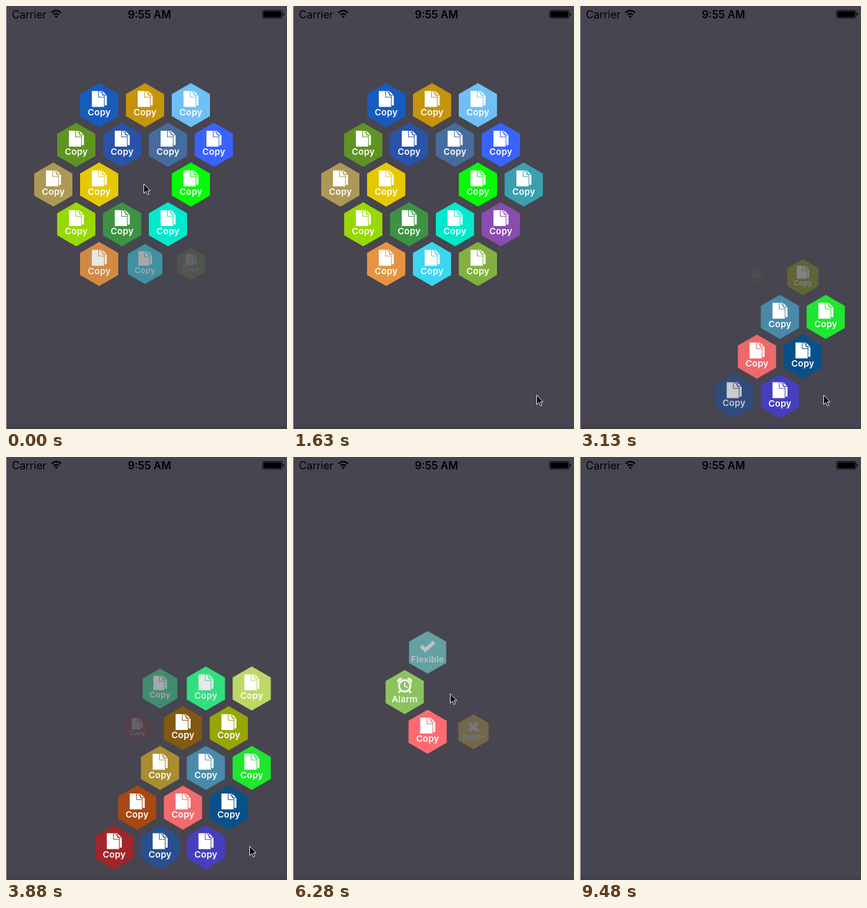
Recreate the animation shown at these times as an HTML page. Size 478 by 719 pixels, loop 9580 ms.

```html
<!DOCTYPE html>
<html lang="en">
<head>
<meta charset="utf-8">
<title>Hexagon menu</title>
<style>
  html, body { margin: 0; width: 100%; height: 100%; overflow: hidden; background: #47454f; }
  svg { display: block; }
  text { font-family: Inter, "Open Sans", sans-serif; }
  .label { font-size: 15px; font-weight: 600; letter-spacing: .2px; fill: #fff; text-anchor: middle; }
  .line { fill: none; stroke-width: 1.1; }
</style>
</head>
<body>
<svg width="478" height="719" viewBox="0 0 478 719">
  <defs>
    <clipPath id="hexClip"><path d="M0-37.4L32.5-18.7V18.7L0 37.4-32.5 18.7V-18.7Z"/></clipPath>
    <linearGradient id="forest" x2="0" y2="1">
      <stop offset="0" stop-color="#3f9a0c"/><stop offset=".4" stop-color="#2f7a10"/>
      <stop offset=".62" stop-color="#25330f"/><stop offset="1" stop-color="#6b5f38"/>
    </linearGradient>
    <linearGradient id="dust" x2="0" y2="1">
      <stop offset="0" stop-color="#a3977d"/><stop offset=".35" stop-color="#cfc3aa"/>
      <stop offset=".6" stop-color="#8d7752"/><stop offset="1" stop-color="#5a4426"/>
    </linearGradient>
  </defs>
  <rect width="478" height="719" fill="#47454f"/>
  <rect y="714" width="478" height="5" fill="#413f4a"/>
  <rect id="edge" width="1" height="719"/>
  <g id="status">
    <text x="10" y="21" font-size="18">Carrier</text>
    <text x="244" y="21" font-size="18" font-weight="600" text-anchor="middle">9:55 AM</text>
    <g fill="none" stroke="#000" stroke-width="2.4">
      <path d="M77.5 11.5Q85.500 4 93.500 11.500"/><path d="M81 15Q85.500 10.800 90 15"/>
    </g>
    <path d="M85.500 20.500L82.800 17.600Q85.500 15.300 88.200 17.600Z"/>
    <rect x="436.500" y="7.500" width="33" height="13" rx="2" fill="none" stroke="#000"/>
    <rect x="438" y="9" width="30" height="10" rx="1"/>
    <path d="M471 11.500q2 .5 2 2.500t-2 2.500z"/>
  </g>
  <g id="menus"></g>
  <path id="cursor" d="M.5.500V16.300L4.200 13 6.700 18.700 9.200 17.600 6.800 12H11.500Z" fill="#000" stroke="#fff" stroke-width="1"/>
</svg>
<script>
const LOOP = 9580, STAGGER = 100, FADE = 370;
const HEX = 'M0-37.4L32.5-18.7V18.7L0 37.4-32.5 18.7V-18.7Z';

const icons = {
  Copy: c => `<path fill="#fff" d="M-12.500-24H5.500L13-16.500V.5H9V3H-12.500Z"/>
    <path class="line" stroke="${c}" d="M-1-24V-13.500H8.500M1.500-24L8.800-15.500V3M5.500-24V-17H13"/>`,
  Flexible: () => '<path fill="none" stroke="#fff" stroke-width="6.500" d="M-11.500-11L-4-4 11.500-18"/>',
  Delete: () => '<path stroke="#fff" stroke-width="7" d="M-9-19L9-2M9-19L-9-2"/>',
  Alarm: () => `<g fill="none" stroke="#fff" stroke-width="3.200">
    <circle cy="-10.500" r="9.600"/><path d="M-7-3L-10.500 1.500M7-3L10.500 1.500"/>
    <path stroke-width="2" d="M0-17V-10.500L5-7.500"/></g>
    <path fill="#fff" d="M-12.500-15Q-14-26-3.500-23.500ZM12.500-15Q14-26 3.500-23.500Z"/>`,
  Photo: () => `<path fill="#fff" d="M-13-18H-7L-5-22H5L7-18H13V2H-13Z"/>
    <circle cy="-8.500" r="6.300" fill="none" stroke="#3c8a1a" stroke-width="3"/>`,
  Game: () => `<circle cy="-10.500" r="13.500" fill="#fff"/>
    <path fill="#6e5c42" d="M-2-14L4-17 8-12 5-7-1-8ZM-12-15L-7-21-4-18-8-11ZM2-1L8-4 5 1Z"/>`
};

const scenery = {
  Photo: '<path stroke="#1c3a0a" stroke-width="2.5" d="M-27-20V18M-18-24V10M16-24V10M25-18V18"/><path fill="#8b7b4d" d="M-3 16H6L22 40H-22Z"/>',
  Game: '<path fill="#4a3a24" d="M-33-2L-25-6-20 6-8 9-10 24-33 24ZM20-4L33-8V20L14 24Z"/><path fill="#efe7d6" d="M-22-22L0-36 10-31-8-16Z"/>'
};

// Cells spiral out counter-clockwise, leaving out those beyond the screen.
function spiral(cx, cy) {
  const cells = [];
  const steps = [[-39, -67.5], [-78, 0], [-39, 67.5], [39, 67.5], [78, 0], [39, -67.5]];
  for (let ring = 1; ring < 5; ring++) {
    let x = cx + 78 * ring, y = cy;
    for (const [dx, dy] of steps)
      for (let i = 0; i < ring; i++) {
        x += dx; y += dy;
        if (x > 0 && x < 445 && y < 682) cells.push([x, y]);
      }
  }
  return cells;
}

const copies = colors => colors.split(' ').map((c, order) => ({ name: 'Copy', fill: '#' + c, order }));

const menus = [
  { start: -1590, end: 1780, center: [236.5, 303.5], items: copies(
    '466c9e 2953a8 e5c900 3d9343 00e9cd 06fb06 ' +
    '3a62ff 6fc0f5 c5940c 165cbf 5f9422 ad9856 98d803 e69442 3bd6f2 82b13f 8b4cae 3aa0b0') },
  { start: 2390, end: 5230, center: [418, 663.5], items: copies(
    '07518a 453fbe 1fe62f 498aab f26a6c 28508f 97a603 825912 aa8c32 a84812 a12529 ' +
    'bcd866 2df683 3ccd8d 89232a fd398c 4a36d9 0d993c') },
  { start: 5855, end: 8660, center: [268, 399.5], items: [
    { name: 'Photo', fill: 'url(#forest)', order: 5 },
    { name: 'Flexible', fill: '#73d0d0', order: 2 },
    { name: 'Alarm', fill: '#8fc95f', order: 1 },
    { name: 'Copy', fill: '#ff6a72', order: 0 },
    { name: 'Delete', fill: '#e7c53e', order: 3 },
    { name: 'Game', fill: 'url(#dust)', order: 4 }] }
];

const layer = document.getElementById('menus');
const cursor = document.getElementById('cursor');
const edge = document.getElementById('edge');

for (const menu of menus) {
  const cells = spiral(...menu.center);
  menu.items.forEach((item, i) => {
    const { name, fill } = item;
    item.cell = cells[i];
    item.node = document.createElementNS('http://www.w3.org/2000/svg', 'g');
    item.node.innerHTML = `<path d="${HEX}" fill="${fill}"/>
      <g clip-path="url(#hexClip)">${scenery[name] || ''}</g>
      ${icons[name](fill)}<text class="label" y="17">${name}</text>`;
    layer.append(item.node);
  });
}

// Pointer path: time, x, y
const track = [
  [0, 234, 302], [450, 234, 302], [880, 290, 380], [1030, 290, 380], [1480, 424, 683],
  [1630, 414, 661], [4480, 414, 661], [5080, 251, 524], [5380, 251, 524], [5530, 273, 397],
  [5680, 267, 402], [6280, 267, 402], [7010, 274, 405], [7310, 299, 405], [7610, 289, 405],
  [7760, 289, 405], [8510, 297, 462], [LOOP, 297, 462]
];

function pointerAt(t) {
  const i = track.findIndex(key => key[0] > t);
  const [t0, x0, y0] = track[i - 1], [t1, x1, y1] = track[i];
  const k = (t - t0) / (t1 - t0);
  return [x0 + (x1 - x0) * k, y0 + (y1 - y0) * k];
}

const smooth = k => k * k * (3 - 2 * k);

// The picture advances in steps of 150 ms with a few short ones.
function hold(t) {
  const shift = t < 880 ? 0 : t < 6420 ? 130 : t < 7010 ? 120 : 110;
  return Math.floor((t - shift) / 150) * 150 + shift;
}

function draw(now) {
  const time = now % LOOP, t = hold(time);
  for (const { start, end, items } of menus)
    for (const { node, cell, order } of items) {
      const age = t - start - order * STAGGER;
      const visible = age > 0 && t < end;
      node.style.display = visible ? '' : 'none';
      if (!visible) continue;
      node.setAttribute('opacity', smooth(Math.min(1, age / FADE)));
      node.setAttribute('transform', `translate(${cell}) scale(${Math.min(1, 0.57 + age / 560)})`);
    }
  cursor.setAttribute('transform', `translate(${pointerAt(t)})`);
  cursor.style.display = t < 8660 ? '' : 'none';
  edge.setAttribute('fill', time < 9480 ? '#a9a9ab' : '#c4c3c0');
  requestAnimationFrame(() => draw(performance.now()));
}
draw(performance.now());
</script>
</body>
</html>
```
